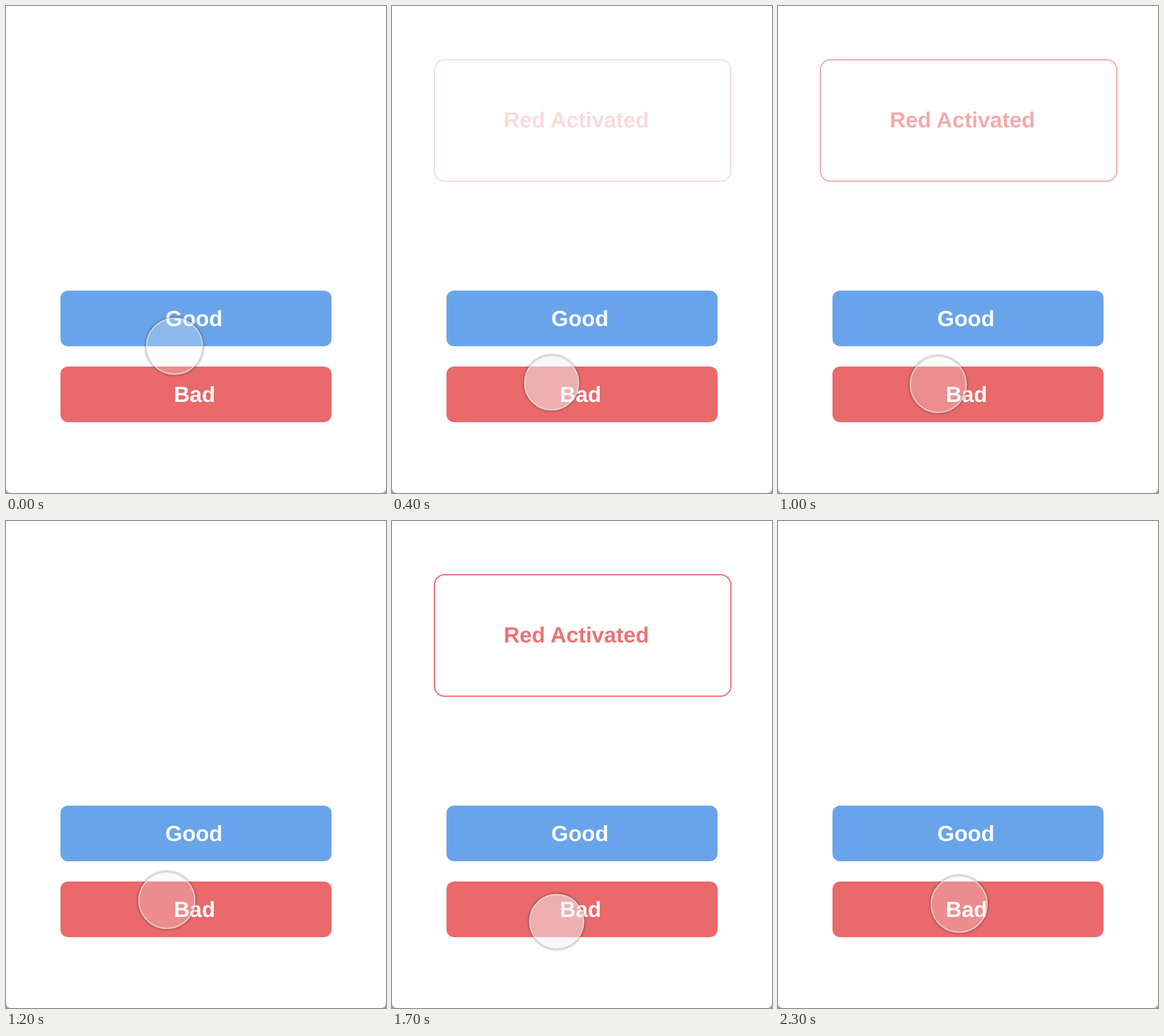
Recreate the animation shown at these times as an HTML page. Size 600x770 px, loop 2400 ms.

```html
<!DOCTYPE html>
<html lang="en">
<head>
<meta charset="utf-8">
<title>Press feedback</title>
<style>
  html, body { margin: 0; width: 100%; height: 100%; overflow: hidden; background: #fff; }
  svg { display: block; width: 600px; height: 770px; }
  text { font: bold 34.6px "Liberation Sans", Arial, sans-serif; text-rendering: geometricPrecision; }
</style>
</head>
<body>
<svg viewBox="0 0 600 770">
  <defs>
    <radialGradient id="shade">
      <stop offset=".89" stop-color="#000" stop-opacity="0"/>
      <stop offset=".91" stop-color="#000" stop-opacity=".24"/>
      <stop offset=".95" stop-color="#000" stop-opacity=".1"/>
      <stop offset="1" stop-color="#000" stop-opacity="0"/>
    </radialGradient>
  </defs>
  <rect y="700" width="600" height="70" fill="#a8a8a8"/>
  <rect y="-20" width="600" height="790" rx="8" fill="#fff"/>

  <g id="card">
    <rect x="67" y="85" width="468" height="192" rx="16" fill="none" stroke="#e9676a" stroke-width="2"/>
    <text x="176.6" y="192" fill="#e9676a">Red Activated</text>
  </g>

  <rect x="86" y="450" width="428" height="88" rx="12" fill="#69a4eb"/>
  <text x="251.5" y="505.5" fill="#fff">Good</text>
  <rect x="86" y="570" width="428" height="88" rx="12" fill="#ea696b"/>
  <text x="265" y="625.5" fill="#fff">Bad</text>

  <g id="touch">
    <circle r="49.5" fill="url(#shade)"/>
    <circle id="glass" r="45" fill="#f0f0f0"/>
    <circle r="44.2" fill="none" stroke="#ece6e4" stroke-opacity=".7" stroke-width="2"/>
  </g>
</svg>
<script>
const LOOP = 2400, STEP = 100;
const [card, touch, glass] = ["card", "touch", "glass"].map(id => document.getElementById(id));

// Pointer path: time, x, y
const path = [
  [0, 266, 538], [300, 252, 594], [400, 252, 596], [800, 252, 597],
  [1200, 254, 600], [1450, 260, 621], [1650, 260, 626],
  [2000, 260, 755], [2300, 286, 606]
];
const presses = [{ down: 290, up: 870 }, { down: 1412, up: 2005 }];

const clamp = v => Math.min(1, Math.max(0, v));
const smooth = v => { v = clamp(v); return v * v * (3 - 2 * v); };
const mix = (a, b, k) => a + (b - a) * k;

// Rises after each press and falls after its release
const pulse = (t, rise, fall) => presses.reduce((sum, { down, up }) =>
  sum + smooth((t - down) / rise) - smooth((t - up) / fall), 0);

function pointerAt(t) {
  const i = path.findIndex(p => p[0] > t);
  if (i < 0) return path[path.length - 1].slice(1);
  const [a, b] = [path[i - 1], path[i]];
  const k = smooth((t - a[0]) / (b[0] - a[0]));
  return [mix(a[1], b[1], k), mix(a[2], b[2], k)];
}

function draw(t) {
  const [x, y] = pointerAt(t);
  const pressed = pulse(t, 85, 150);
  card.setAttribute("opacity", clamp(pulse(t, 350, 280)));
  touch.setAttribute("transform", `translate(${x} ${y}) scale(${mix(1, 43.5 / 45, pressed)})`);
  glass.setAttribute("fill-opacity", mix(0.26, 0.52, pressed));
}

const start = performance.now();
function tick() {
  const t = (performance.now() - start) % LOOP;
  draw(Math.floor(t / STEP) * STEP);
  requestAnimationFrame(tick);
}
tick();
</script>
</body>
</html>
```
